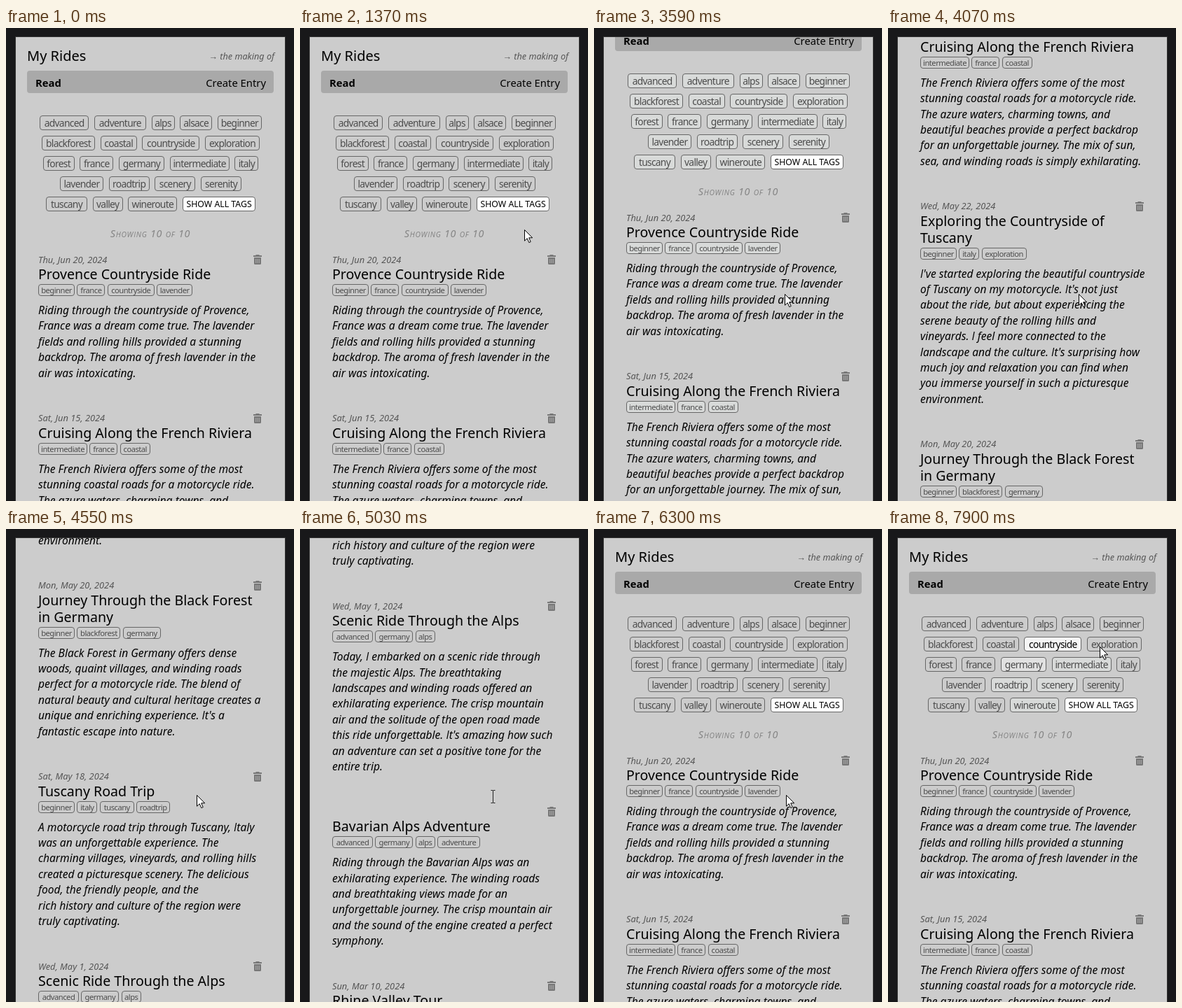
These frames come from a looping animation (411 px wide and 676 px high, 8 s). An HTML page:

```html
<!DOCTYPE html>
<html lang="en">
<head>
<meta charset="utf-8">
<title>My Rides</title>
<style>
html, body { margin: 0; width: 100%; height: 100%; overflow: hidden; background: #18181a; }
body { position: relative; color: #000; font-family: "Noto Sans", "Open Sans", sans-serif; }
#card { position: absolute; left: 14px; top: 13px; width: 384px; bottom: 0; overflow: hidden;
  background: #ccc; box-shadow: 0 0 0 1px #333; }
#page { position: absolute; left: -14px; top: -13px; width: 411px; white-space: pre; }
#page > * { position: absolute; }
.cap { font-family: "Open Sans", sans-serif; line-height: 0; font-style: inherit; }
.home { left: 30px; top: 28px; font-size: 20px; line-height: 24px; }
.more { right: 28px; top: 31.5px; font: italic 12.6px/18px "Noto Sans", sans-serif; color: #555; }
nav { left: 30px; top: 61px; width: 352px; height: 32px; box-sizing: border-box; padding: 1px 11px 0 12px;
  border-radius: 4px; background: #a9a9a9; display: flex; justify-content: space-between;
  font-size: 14.8px; line-height: 32px; }
.row { left: 0; width: 413px; display: flex; justify-content: center; gap: 7.7px; }
.tag { box-sizing: border-box; flex: none; display: flex; justify-content: center; height: 21px;
  border: 1px solid #666; border-radius: 4px; color: #4c4c4c;
  font-size: 13.8px; font-weight: 300; line-height: 19px; letter-spacing: -.7px; }
.tag.lit { background: #d8dad9; }
.tag.fade { background: #e1e1e1; }
.tag.on { background: #f5f5f5; color: #000; font-weight: 400; }
.all { background: #fff; color: #000; font-size: 12.3px; font-weight: 400; letter-spacing: 0; line-height: 20px; }
.count { left: 0; width: 412px; top: 283.5px; text-align: center; color: #858585;
  font: italic 14.4px/20px "Noto Sans", sans-serif; letter-spacing: .7px; }
.count small { font-size: 10.4px; line-height: 0; }
#list { left: 46px; top: 320px; width: 319px; }
.entry { position: relative; margin-bottom: 42.75px; }
.date { height: 20px; padding-top: 1.5px; box-sizing: border-box; color: #555;
  font: italic 12.8px/18px "Noto Sans", sans-serif; }
.entry h2 { margin: 0; font-size: 19.6px; font-weight: 400; line-height: 23.6px; }
.tags { display: flex; gap: 3.4px; margin: 2.4px 0 9px; }
.tags .tag { height: 17px; font-size: 11.2px; line-height: 15px; letter-spacing: -.5px; }
.entry p { margin: 0; font-size: 15.55px; font-style: italic; line-height: 22.4px; }
.bin { position: absolute; right: 0; top: 3.9px; }
.cur { position: absolute; left: 0; top: 0; overflow: visible; }
</style>
</head>
<body>
<div id="card"><div id="page">
  <div class="home">My Rides</div>
  <div class="more">→ the making of</div>
  <nav><b>Read</b><span>Create Entry</span></nav>
  <div id="list"></div>
</div></div>
<svg class="cur" id="arrow" width="13" height="20">
  <path d="M.5 .5V16.2L4.2 12.7L6.8 18.6L9.2 17.6L6.7 11.8H11.7Z" fill="#fff" stroke="#000"/>
</svg>
<svg class="cur" id="beam" width="8" height="20">
  <path d="M.5 .5H3L3.5 1L4 .5H6.5M3.5 1V18M.5 18.5H3L3.5 18L4 18.5H6.5" fill="none" stroke="#222"/>
</svg>
<script>
const LOOP = 8000;
const $ = id => document.getElementById(id);

const rows = [
  'advanced:70 adventure:74 alps:33 alsace:46 beginner:63',
  'blackforest:76 coastal:52 countryside:82 exploration:78',
  'forest:45 france:48 germany:65 intermediate:85 italy:34',
  'lavender:62 roadtrip:58 scenery:58 serenity:58',
  'tuscany:59 valley:43 wineroute:70'
];

// date | title | tags | text, with / between lines
const rides = `
Thu, Jun 20, 2024|Provence Countryside Ride|beginner france countryside lavender|Riding through the countryside of Provence,/France was a dream come true. The lavender/fields and rolling hills provided a stunning/backdrop. The aroma of fresh lavender in the/air was intoxicating.
Sat, Jun 15, 2024|Cruising Along the French Riviera|intermediate france coastal|The French Riviera offers some of the most/stunning coastal roads for a motorcycle ride./The azure waters, charming towns, and/beautiful beaches provide a perfect backdrop/for an unforgettable journey. The mix of sun,/sea, and winding roads is simply exhilarating.
Wed, May 22, 2024|Exploring the Countryside of/Tuscany|beginner italy exploration|I've started exploring the beautiful countryside/of Tuscany on my motorcycle. It's not just/about the ride, but about experiencing the/serene beauty of the rolling hills and/vineyards. I feel more connected to the/landscape and the culture. It's surprising how/much joy and relaxation you can find when/you immerse yourself in such a picturesque/environment.
Mon, May 20, 2024|Journey Through the Black Forest/in Germany|beginner blackforest germany|The Black Forest in Germany offers dense/woods, quaint villages, and winding roads/perfect for a motorcycle ride. The blend of/natural beauty and cultural heritage creates a/unique and enriching experience. It's a/fantastic escape into nature.
Sat, May 18, 2024|Tuscany Road Trip|beginner italy tuscany roadtrip|A motorcycle road trip through Tuscany, Italy/was an unforgettable experience. The/charming villages, vineyards, and rolling hills/created a picturesque scenery. The delicious/food, the friendly people, and the/rich history and culture of the region were/truly captivating.
Wed, May 1, 2024|Scenic Ride Through the Alps|advanced germany alps|Today, I embarked on a scenic ride through/the majestic Alps. The breathtaking/landscapes and winding roads offered an/exhilarating experience. The crisp mountain/air and the solitude of the open road made/this ride unforgettable. It's amazing how such/an adventure can set a positive tone for the/entire trip.
|Bavarian Alps Adventure|advanced germany alps adventure|Riding through the Bavarian Alps was an/exhilarating experience. The winding roads/and breathtaking views made for an/unforgettable journey. The crisp mountain air/and the sound of the engine created a perfect/symphony.
Sun, Mar 10, 2024|Rhine Valley Tour|intermediate germany valley|The Rhine Valley is a wonderful place for/a motorcycle tour.`.trim().split('\n');

const bin = `<svg class="bin" width="12" height="14" fill="#777"><path d="M4 0H8L9 1H12V3H0V1H3Z"/>
<path d="M1 4H11V12.5Q11 14 9.5 14H2.5Q1 14 1 12.5Z"/><path d="M3.7 6V12M6 6V12M8.3 6V12" stroke="#bbb" stroke-width=".8"/></svg>`;

const width = {};
const cap = s => s.replace(/I/g, '<i class="cap">I</i>');
const lines = s => cap(s.replace(/\//g, '\n'));
const tag = (name, w) => `<span class="tag" data-tag="${name}" style="width:${w}px">${name}</span>`;
const smallTag = name => tag(name, Math.round(width[name] * .79 + 2.4));

const cloud = rows.map((row, i) => {
  const tags = row.split(' ').map(item => {
    const [name, w] = item.split(':');
    width[name] = +w;
    return tag(name, w);
  }).join('');
  const all = i === 4 ? '<span class="tag all" style="width:104px">SHOW ALL TAGS</span>' : '';
  return `<div class="row" style="top:${125 + 29 * i}px">${tags}${all}</div>`;
}).join('');
const count = `<div class="count">S<small>${cap('HOWING')}</small> 10 <small>OF</small> 10</div>`;
$('list').insertAdjacentHTML('beforebegin', cloud + count);

$('list').innerHTML = rides.map(ride => {
  const [date, title, tags, text] = ride.split('|');
  return `<div class="entry">${bin}<div class="date">${date}</div><h2>${lines(title)}</h2>` +
    `<div class="tags">${tags.split(' ').map(smallTag).join('')}</div><p>${lines(text)}</p></div>`;
}).join('');

// time, x, y of the pointer tip
const pointer = [
  [0, -50, -50], [1370, 320, 288], [1490, 310, 276], [1610, 298, 261], [1730, 312, 264],
  [1850, 330, 272], [1970, 341, 276], [2090, 332, 268], [2210, 285, 284], [2330, 228, 299],
  [2460, 238, 302], [2710, 215, 305], [2830, 190, 301], [2950, 161, 298], [3070, 172, 295],
  [3220, 230, 340], [3340, 272, 380], [5030, 274, 380], [6730, 280, 382], [6850, 293, 362],
  [6970, 285, 330], [7090, 262, 299], [7210, 240, 313], [7360, 195, 314], [7510, 202, 259],
  [7660, 214, 200], [7780, 245, 168], [7900, 302, 168]
];

// time, scroll offset
const scroll = [
  [0, 0], [3460, 14], [3590, 60], [3710, 170], [3830, 300], [3950, 428], [4070, 552],
  ...[1, 2, 3, 4, 5, 6, 7, 8].map(k => [4070 + 120 * k, 552 + Math.round(128.6 * k)]),
  [5170, 1600], [5450, 1490], [5570, 1300], [5690, 1090], [5810, 881], [5930, 640],
  [6180, 200], [6300, 0]
];

const at = (track, t) => track.findLast(key => key[0] <= t);
const chips = [...document.querySelectorAll('[data-tag]')];
const cloudChips = Object.fromEntries(chips.slice(0, Object.keys(width).length).map(el => [el.dataset.tag, el]));
const passed = ['germany', 'intermediate', 'roadtrip', 'scenery', 'wineroute'];

function draw() {
  const t = performance.now() % LOOP;
  const [, x, y] = at(pointer, t);
  $('page').style.transform = `translateY(${-at(scroll, t)[1]}px)`;

  const reading = t >= 5030 && t < 5450;
  $('arrow').style.transform = `translate(${x}px,${y}px)`;
  $('arrow').style.visibility = reading ? 'hidden' : 'visible';
  $('beam').style.transform = `translate(${x - 2}px,${y - 7}px)`;
  $('beam').style.visibility = reading ? 'visible' : 'hidden';

  const moving = t >= 3220 && t < 3950;
  chips.forEach(el => el.classList.toggle('lit', moving));
  passed.forEach(name => cloudChips[name].classList.toggle('lit', moving || t >= 7660));
  cloudChips.germany.classList.toggle('on', t >= 7660 && t < 7780);
  cloudChips.germany.classList.toggle('fade', t >= 7780);
  cloudChips.countryside.classList.toggle('on', t >= 7780);
  requestAnimationFrame(draw);
}
draw();
</script>
</body>
</html>
```
